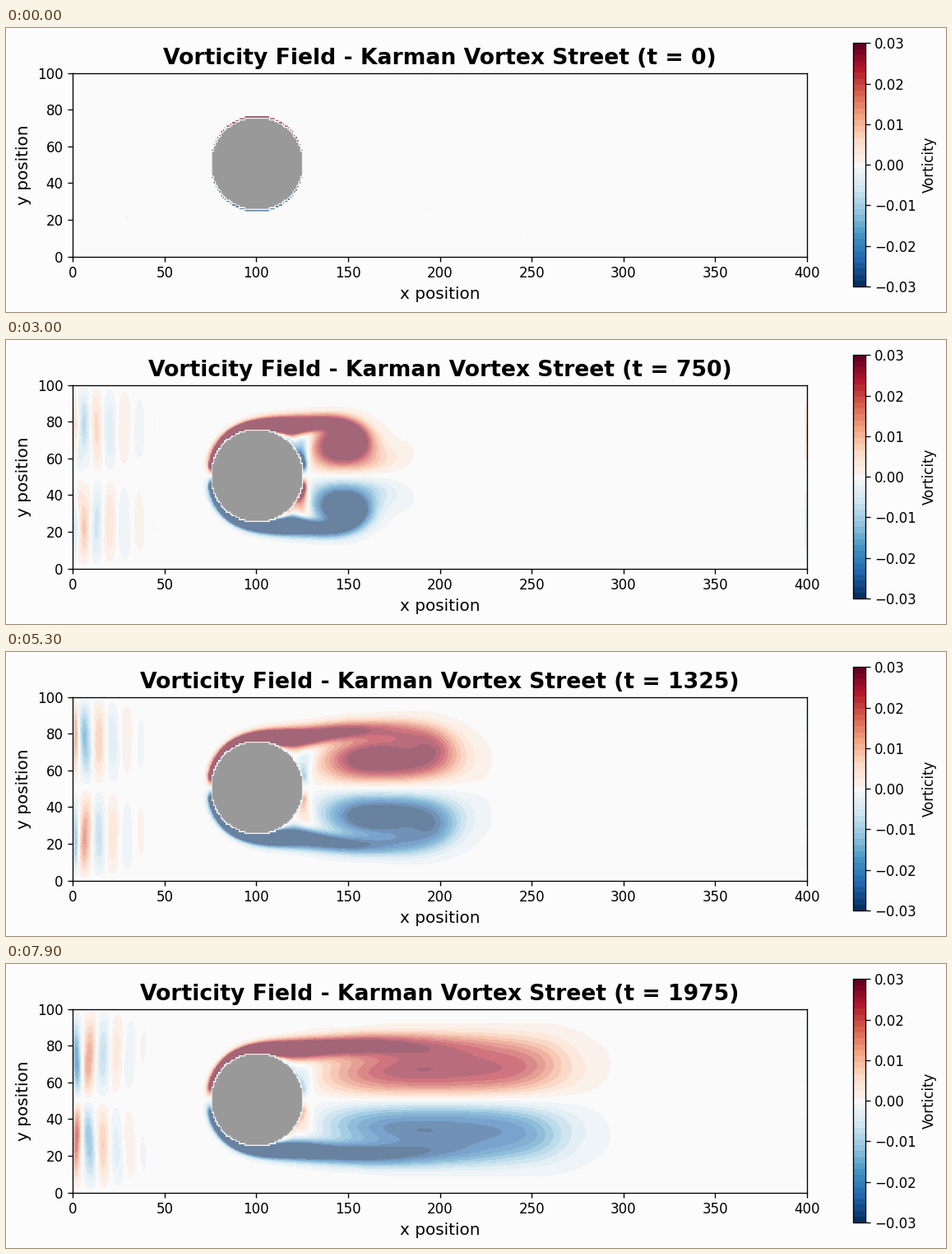
These frames come from a looping animation (1143 px wide and 345 px high, 8 s). A matplotlib script:

```python
import numpy as np
import matplotlib.pyplot as plt
from matplotlib.animation import FuncAnimation
from matplotlib.cm import ScalarMappable
from matplotlib.colors import Normalize

W, H, DPI = 1143, 345, 120
NX, NY = 400, 100
FRAMES, STEPS, INTERVAL = 80, 25, 100
TAU, INFLOW = 0.6, 0.1
VMAX = 0.03
PAPER = "#fcfcfc"

# D2Q9 lattice: rest, then clockwise from north
CX = [0, 0, 1, 1, 1, 0, -1, -1, -1]
CY = [0, 1, 1, 0, -1, -1, -1, 0, 1]
WEIGHT = [4 / 9] + [1 / 9, 1 / 36] * 4
OPPOSITE = [0, 5, 6, 7, 8, 1, 2, 3, 4]
WEST = [6, 7, 8]

X, Y = np.meshgrid(np.arange(NX), np.arange(NY))
cylinder = (X - NX / 4) ** 2 + (Y - NY / 2) ** 2 < (NY / 4) ** 2


def equilibrium(i, rho, ux, uy):
    cu = 3 * (CX[i] * ux + CY[i] * uy)
    return WEIGHT[i] * rho * (1 + cu + 0.5 * cu * cu
                              - 1.5 * (ux * ux + uy * uy))


inlet = np.array([[equilibrium(i, 1, INFLOW, 0)] for i in range(9)],
                 dtype=np.float32)


def start_state():
    rng = np.random.default_rng(42)
    noise = 1e-4 * rng.standard_normal((9, NY, NX))
    return (inlet[:, :, None] + noise).astype(np.float32)


def moments(f):
    rho = f.sum(axis=0)
    ux = (f[2] + f[3] + f[4] - f[6] - f[7] - f[8]) / rho
    uy = (f[1] + f[2] + f[8] - f[4] - f[5] - f[6]) / rho
    return rho, ux, uy


def step(f):
    for i in range(1, 9):
        f[i] = np.roll(f[i], (CY[i], CX[i]), axis=(0, 1))
    # fixed speed on the left, open end on the right
    f[:, :, 0] = inlet * f[:, :, 1].sum(axis=0)
    f[WEST, :, -1] = f[WEST, :, -2]
    bounced = f[:, cylinder][OPPOSITE]
    rho, ux, uy = moments(f)
    for i in range(9):
        f[i] += (equilibrium(i, rho, ux, uy) - f[i]) / TAU
    f[:, cylinder] = bounced
    return ux, uy


def curl(ux, uy):
    ux[cylinder] = uy[cylinder] = 0
    dudy = np.roll(ux, -1, axis=0) - np.roll(ux, 1, axis=0)
    dvdx = np.roll(uy, -1, axis=1) - np.roll(uy, 1, axis=1)
    return np.where(cylinder, np.nan, dudy - dvdx)


def simulate():
    f = start_state()
    fields = []
    for n in range((FRAMES - 1) * STEPS + 1):
        ux, uy = step(f)
        if n % STEPS == 0:
            fields.append(curl(ux, uy))
    return fields


def place(x0, y0, x1, y1):
    return fig.add_axes([x0 / W, 1 - y1 / H, (x1 - x0) / W, (y1 - y0) / H])


fields = simulate()

fig = plt.figure(figsize=(W / DPI, H / DPI), dpi=DPI, facecolor=PAPER)
ax = place(81.2, 54.5, 974, 277.7)
bar = place(1029.8, 18.3, 1044.6, 314)

norm = Normalize(-VMAX, VMAX)
cmap = plt.get_cmap("RdBu_r")
view = dict(origin="lower", extent=[0, NX, 0, NY], aspect="auto")
flow = ax.imshow(fields[0], cmap=cmap.resampled(21), norm=norm, **view)
ax.imshow(~cylinder, cmap="gray", alpha=0.4, **view)
ax.set_xlabel("x position", fontsize=12)
ax.set_ylabel("y position", fontsize=12)
title = ax.set_title("", fontsize=16, fontweight="bold")

scale = ScalarMappable(norm, cmap.resampled(41))
fig.colorbar(scale, cax=bar, label="Vorticity",
             ticks=np.linspace(-VMAX, VMAX, 7))


def update(n):
    flow.set_data(fields[n])
    title.set_text(f"Vorticity Field - Karman Vortex Street (t = {n * STEPS})")
    return flow, title


anim = FuncAnimation(fig, update, frames=FRAMES, interval=INTERVAL,
                     repeat=True, repeat_delay=0, blit=False)
plt.show()
```
